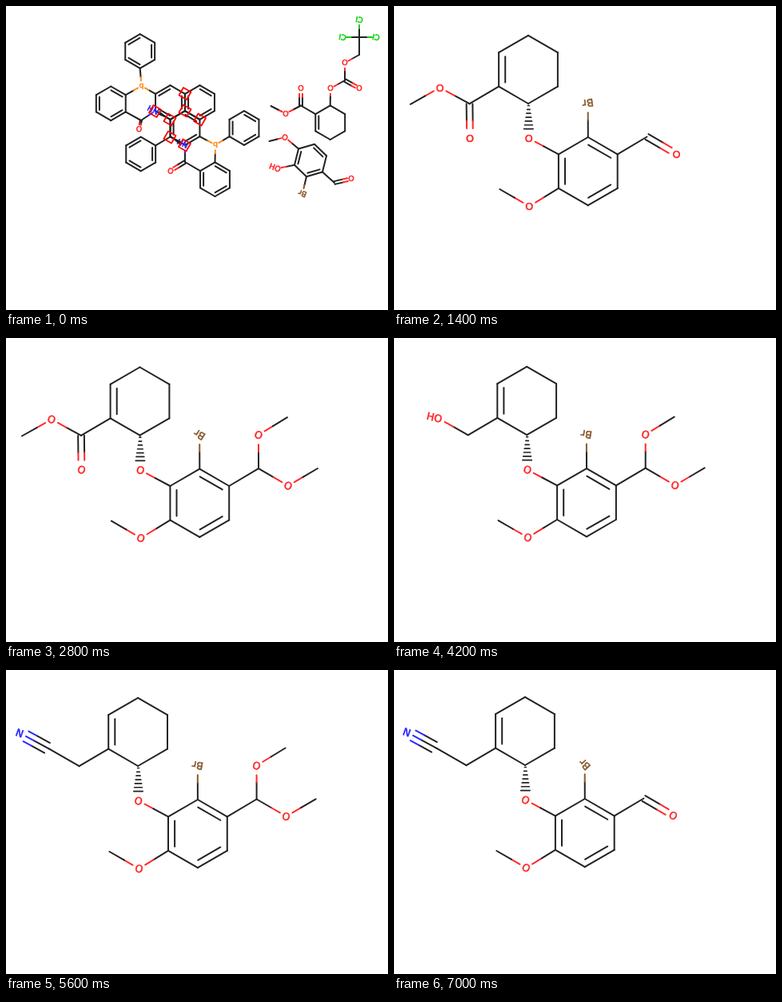
An HTML page with a canvas that plays this animation: 478 by 380 pixels, repeating every 8000 ms.

```html
<!DOCTYPE html>
<html lang="en">
<head>
<meta charset="utf-8">
<title>Reaction steps</title>
<style>
html, body { margin: 0; width: 100%; height: 100%; overflow: hidden; background: #fff; }
canvas { display: block; }
</style>
</head>
<body>
<canvas id="stage" width="478" height="380"></canvas>
<script>
const ctx = document.getElementById('stage').getContext('2d');
const BLACK = '#222';
const COLORS = { O: '#ff2a2a', N: '#2a2aff', P: '#ff8c1a', Br: '#8a5c30', Cl: '#14d014' };
let fontSize, clipScale;

function line(x1, y1, x2, y2, color = BLACK, width = 2) {
  ctx.strokeStyle = color;
  ctx.lineWidth = width;
  ctx.beginPath();
  ctx.moveTo(x1, y1);
  ctx.lineTo(x2, y2);
  ctx.stroke();
}

// Draws a labelled atom and returns it as a bond end.
function atom(el, x, y, degrees = 0, text = el, dx = 0, dy = 0) {
  ctx.save();
  ctx.translate(x + dx, y + dy);
  ctx.rotate(degrees * Math.PI / 180);
  ctx.font = fontSize + 'px "DejaVu Sans", sans-serif';
  ctx.textAlign = 'center';
  ctx.fillStyle = ctx.strokeStyle = COLORS[el];
  ctx.lineWidth = 0.6;
  ctx.fillText(text, 0, fontSize * 0.365);
  ctx.strokeText(text, 0, fontSize * 0.365);
  ctx.restore();
  return [x, y, COLORS[el]];
}

// order 1, 2 or 3; 'in' adds a second line on the clockwise side.
function bond(a, b, order = 1) {
  const dx = b[0] - a[0], dy = b[1] - a[1], len = Math.hypot(dx, dy);
  const gap = (8 + 4 * (dy / len) ** 2) * clipScale / len;
  const start = a[2] ? gap : 0, end = b[2] ? 1 - gap : 1;
  const stroke = (offset, trim) => {
    const at = t => [a[0] + dx * t - dy * offset, a[1] + dy * t + dx * offset];
    const from = Math.max(start, trim), to = Math.min(end, 1 - trim);
    if (a[2] === b[2]) return line(...at(from), ...at(to), a[2]);
    line(...at(from), ...at(0.5), a[2]);
    line(...at(0.5), ...at(to), b[2]);
  };
  if (order === 2) { stroke(-0.09, 0); stroke(0.09, 0); return; }
  stroke(0, 0);
  if (order === 'in') stroke(0.19, 0.12);
  if (order === 3) { stroke(-0.17, 0.07); stroke(0.17, 0.07); }
}

function chain(...atoms) {
  for (let i = 1; i < atoms.length; i++) bond(atoms[i - 1], atoms[i]);
}

// Six-ring, vertices clockwise from the top; `doubles` lists edge numbers.
function ring(cx, cy, r, doubles, degrees = 0) {
  const v = Array.from({ length: 6 }, (_, i) => {
    const angle = (i * 60 - 90 + degrees) * Math.PI / 180;
    return [cx + r * Math.cos(angle), cy + r * Math.sin(angle)];
  });
  v.forEach((p, i) => bond(p, v[(i + 1) % 6], doubles.includes(i) ? 'in' : 1));
  return v;
}

function wedge([x1, y1], [x2, y2], half) {
  const len = Math.hypot(x2 - x1, y2 - y1);
  const nx = (y1 - y2) / len * half, ny = (x2 - x1) / len * half;
  ctx.fillStyle = BLACK;
  ctx.beginPath();
  ctx.moveTo(x1, y1);
  ctx.lineTo(x2 + nx, y2 + ny);
  ctx.lineTo(x2 - nx, y2 - ny);
  ctx.fill();
}

function clashMark(x, y) {
  ctx.save();
  ctx.translate(x, y);
  ctx.rotate(Math.PI / 6);
  ctx.strokeStyle = '#f00';
  ctx.lineWidth = 1.8;
  ctx.strokeRect(-5.5, -5.5, 11, 11);
  ctx.restore();
}

const EVEN = [0, 2, 4], ODD = [1, 3, 5];

function ligand() {
  const r = 21.3;
  const topPhenyl = ring(167.7, 56.5, r, ODD);
  const leftAryl = ring(131.3, 121.8, r, EVEN);
  const innerUpper = ring(205.5, 120.5, r, ODD);
  ring(242.5, 120.5, r, EVEN);
  const innerLower = ring(224, 152.5, r, EVEN);
  const lowPhenyl = ring(168.7, 185, r, ODD);
  const rightPhenyl = ring(298, 152.5, r, EVEN);
  const lowAryl = ring(261.5, 216.7, r, EVEN);

  const p1 = atom('P', 169.5, 100, 0, 'q', 0, -1.5);
  const p2 = atom('P', 262, 173.5, 0, 'q', 0, -1.5);
  const n1 = atom('N', 187, 131, 28, 'HN', -3, -1);
  const n2 = atom('N', 224, 174, 28, 'HN', -3, -2);
  const c1 = [169, 143], c2 = [224, 195], s1 = [205.5, 142], s2 = [205.5, 163.5];
  for (const end of [topPhenyl[3], leftAryl[1], innerUpper[5]]) bond(end, p1);
  for (const end of [rightPhenyl[4], lowAryl[0], innerLower[2]]) bond(end, p2);
  chain(leftAryl[2], c1, n1, s1, s2, n2, c2, lowAryl[5]);
  bond(s2, lowPhenyl[1]);
  bond(c1, atom('O', 166.5, 153.5, 15), 2);
  bond(c2, atom('O', 206, 206, 15), 2);
  wedge(s1, [191, 133.5], 2.2);
  wedge(s2, [218, 171], 2.2);
  for (const [x, y] of [[224, 109.5], [186.5, 131.5], [205, 142], [224, 131], [242.5, 142], [205, 164], [223.5, 174]]) {
    clashMark(x, y);
  }
}

function carbonate() {
  const ene = ring(405.7, 145.7, 21.3, [4]);
  const ccl = [442, 39], carbonyl = [424, 93], ester = [369, 124.5];
  for (const [x, y] of [[442, 17], [421, 39], [463, 39]]) bond(ccl, atom('Cl', x, y, 190));
  chain(ccl, [442, 61], atom('O', 424, 71), carbonyl, atom('O', 406, 103), ene[0]);
  bond(carbonyl, atom('O', 442, 103), 2);
  bond(ene[5], ester);
  bond(ester, atom('O', 369, 103), 2);
  chain(ester, atom('O', 350, 134.5), [331.5, 125]);
}

function phenol() {
  const v = ring(381, 193, 20.8, EVEN, 14);
  const cho = [411, 221];
  chain(v[5], atom('O', 349, 164, 15), [329.5, 169]);
  bond(v[4], atom('O', 340, 203, 20, 'HO', -3.5, -1));
  bond(v[3], atom('Br', 371, 234.5, 200));
  chain(v[2], cho);
  bond(cho, atom('O', 432, 216), 2);
}

function reagents() {
  fontSize = 9.5;
  clipScale = 0.56;
  ligand();
  carbonate();
  phenol();
}

// Head groups on the cyclohexene.
function methylEster(c, tilt) {
  chain(c, atom('O', 57.5, 102, tilt), [20.5, 122.8]);
  bond(c, atom('O', 95, 165, tilt), 2);
}
function alcohol(c) {
  bond(c, atom('O', 57.5, 101.5, 13, 'HO', -5.2, -1.3));
}
function nitrile(c) {
  const cn = [57, 100.7];
  bond(c, cn);
  bond(cn, atom('N', 20, 80.7, 20), 3);
}

// Tail groups on the arene.
function aldehyde(c, tilt) {
  bond(c, atom('O', 353.5, 185, tilt), 2);
}
function acetal(c, tilt) {
  chain(c, atom('O', 316.5, 121.5, tilt), [352.5, 99.5]);
  chain(c, atom('O', 353.5, 185, tilt), [390.5, 163.3]);
}

function product(shiftX, shiftY, head, tail, tilt, bromineTurn) {
  fontSize = 12.7;
  clipScale = 1;
  ctx.translate(shiftX, shiftY);
  const ene = ring(168, 79.4, 42.6, [4]);
  const arene = ring(242.8, 206.6, 42.6, EVEN);
  const headC = [94.5, 122.2], tailC = [316.5, 163.5];
  bond(ene[4], headC);
  head(headC, tilt);
  bond(arene[1], tailC);
  tail(tailC, tilt);
  bond(atom('O', 168.7, 165.5, tilt), arene[5]);
  chain(arene[4], atom('O', 169.3, 250.3, tilt), [132.3, 229]);
  bond(arene[0], atom('Br', 242.7, 121.3, bromineTurn));
  for (let i = 0; i < 7; i++) {
    const half = 0.9 + i * 0.8, y = 124.5 + i * 4.85;
    line(168.4 - half, y, 168.4 + half, y, BLACK, 1.7);
  }
}

const scenes = [
  reagents,
  () => product(0, 0, methylEster, aldehyde, 0, 172),
  () => product(-0.5, -0.3, methylEster, acetal, 20, 212),
  () => product(-1.8, -0.9, alcohol, acetal, 15, 190),
  () => product(-2.9, -2, nitrile, acetal, 15, 190),
  () => product(-4, -3, nitrile, aldehyde, 30, 228)
];

function draw(now) {
  const scene = scenes[Math.floor(now % 8000 / 1400)];
  ctx.setTransform(1, 0, 0, 1, 0, 0);
  ctx.fillStyle = '#fff';
  ctx.fillRect(0, 0, 478, 380);
  ctx.lineCap = 'round';
  ctx.lineJoin = 'round';
  scene();
  requestAnimationFrame(draw);
}
draw(performance.now());
</script>
</body>
</html>
```
